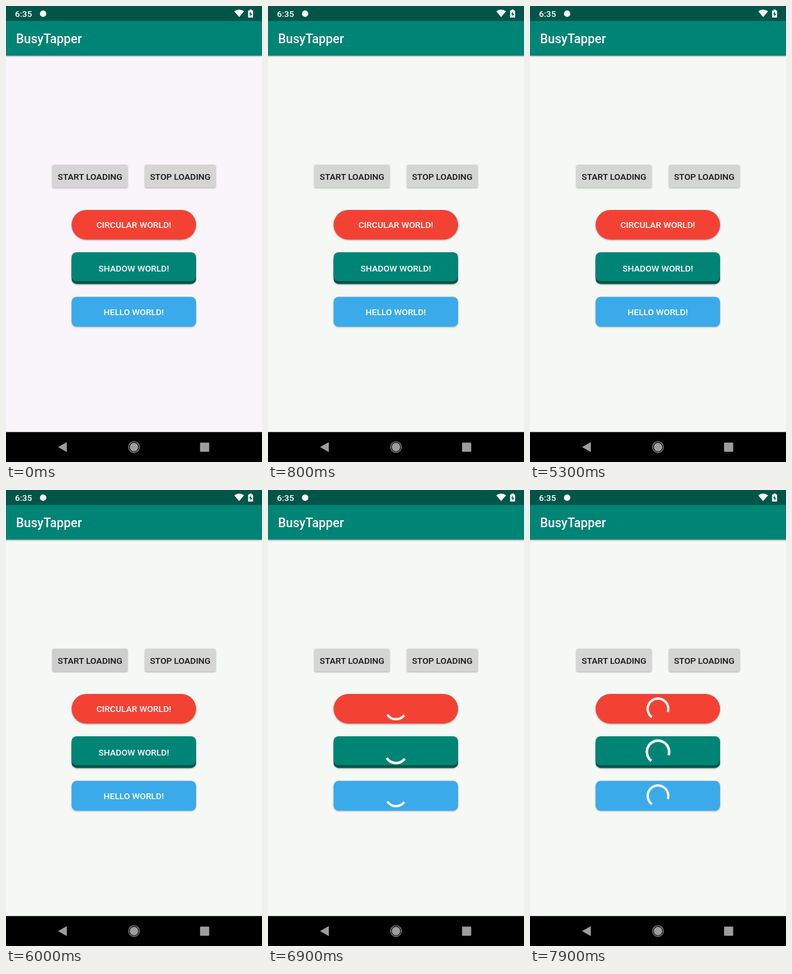
Write an HTML page that moves like this. It is 400 by 711 pixels and loops after 8 s.

```html
<!DOCTYPE html>
<html lang="en">
<head>
<meta charset="utf-8">
<title>Loading buttons</title>
<style>
  html, body { margin: 0; width: 100%; height: 100%; overflow: hidden; }
  svg { display: block; width: 100%; height: 100%; }
  text { font: 500 13.6px Roboto, sans-serif; }
  .title { font-size: 19.5px; }
  .label, .light { text-anchor: middle; }
  .light, .white { fill: #fff; }
  .label { fill: #151515; }
  .ring { fill: none; stroke: #fff; }
  .soft { filter: drop-shadow(0 1px 1px rgba(0, 0, 0, .3)); }
  .grey { fill: #9d9d9d; }
</style>
</head>
<body>
<svg viewBox="0 0 400 711">
  <rect id="page" width="400" height="711"/>

  <g class="soft"><rect y="20" width="400" height="57.5" fill="#008475"/></g>
  <rect width="400" height="23.3" fill="#005549"/>
  <text class="white" x="14" y="17">6:35</text>
  <circle class="white" cx="58" cy="12" r="5"/>
  <path class="white" d="M364.3 17.3 356.6 8.2Q364.3 2.8 372 8.2Z"/>
  <path class="white" d="M378.3 7h2.2V5.5h3.4V7h2.2v11h-7.8Z"/>
  <path d="M382.7 8.6 379.8 13h2v3.4l2.9-4.5h-2Z" fill="#005549"/>
  <text class="white title" x="15.8" y="58">BusyTapper</text>

  <g class="soft">
    <rect id="start" x="72.5" y="247.5" width="117.5" height="35.5" rx="2"/>
    <rect x="217" y="247.5" width="110.5" height="35.5" rx="2" fill="#d5d5d4"/>
  </g>
  <text class="label" x="131.3" y="270.6">START LOADING</text>
  <text class="label" x="272.2" y="270.6">STOP LOADING</text>

  <g class="soft">
    <rect x="102.5" y="318" width="194.5" height="46.3" rx="23.1" fill="#f34234"/>
    <rect x="102.5" y="388" width="194.5" height="45.4" rx="8" fill="#005549"/>
    <rect x="102.5" y="384" width="194.5" height="45" rx="8" fill="#008475"/>
    <rect x="102.5" y="453.5" width="194.5" height="46.5" rx="8" fill="#3baaea"/>
  </g>
  <g id="names">
    <text class="light" x="199.7" y="346.2">CIRCULAR WORLD!</text>
    <text class="light" x="199.7" y="414">SHADOW WORLD!</text>
    <text class="light" x="199.7" y="482">HELLO WORLD!</text>
  </g>
  <g id="rings"></g>

  <rect y="664.3" width="400" height="47" fill="#000"/>
  <path class="grey" d="M81.3 687.8 95 680v15.6Z"/>
  <circle class="grey" cx="200" cy="687.7" r="6.7"/>
  <circle cx="200" cy="687.7" r="8.4" fill="none" stroke="#9d9d9d" stroke-width="1.1"/>
  <rect class="grey" x="303.2" y="680.8" width="14.3" height="14.3" rx="1"/>
</svg>
<script>
  const LOOP = 8000, LOADING_AT = 6200;
  const SWEEP_MS = 1000, SWEEP_START = 5780;
  const MIN_ARC = 50, TRAVEL = 360 - 2 * MIN_ARC;
  const byId = id => document.getElementById(id);
  const clamp01 = v => Math.min(1, Math.max(0, v));

  const rings = [
    { y: 341.3, r: 16.1, width: 3.6 },
    { y: 408.3, r: 17.4, width: 4 },
    { y: 476.8, r: 16.1, width: 3.6 }
  ].map(ring => {
    const path = document.createElementNS(byId('rings').namespaceURI, 'path');
    path.setAttribute('class', 'ring');
    path.setAttribute('stroke-width', ring.width);
    byId('rings').append(path);
    return { ...ring, path };
  });

  // Tail angle and length in degrees, clockwise from three o'clock.
  function arcAt(t) {
    const elapsed = Math.max(0, t - SWEEP_START) / SWEEP_MS;
    const cycle = Math.floor(elapsed);
    const swept = TRAVEL * (1 - (1 - elapsed % 1) ** 2);
    const spin = 137 + (t - 6900) * (t < 6900 ? .365 : .39);
    const tail = spin - 2 * MIN_ARC * Math.ceil(cycle / 2);
    return cycle % 2
      ? { tail, length: swept + MIN_ARC }
      : { tail: tail + swept, length: 360 - MIN_ARC - swept };
  }

  function drawRing({ y, r, path }, { tail, length }) {
    const point = deg => {
      const a = deg * Math.PI / 180;
      return `${200 + r * Math.cos(a)} ${y + r * Math.sin(a)}`;
    };
    const large = length > 180 ? 1 : 0;
    path.setAttribute('d', `M${point(tail)}A${r} ${r} 0 ${large} 1 ${point(tail + length)}`);
  }

  function render(t) {
    const loading = t >= LOADING_AT;
    const press = clamp01((t - 5950) / 150) * clamp01((6850 - t) / 500);
    const shade = Math.round(213 - 20 * press);
    byId('page').setAttribute('fill', t < 100 ? '#f9f5fb' : '#f6f8f6');
    byId('start').setAttribute('fill', `rgb(${shade},${shade},${shade})`);
    byId('names').style.display = loading ? 'none' : '';
    byId('rings').style.display = loading ? '' : 'none';
    if (loading) {
      const arc = arcAt(t);
      rings.forEach(ring => drawRing(ring, arc));
    }
  }

  function tick() {
    render(performance.now() % LOOP);
    requestAnimationFrame(tick);
  }
  tick();
</script>
</body>
</html>
```
